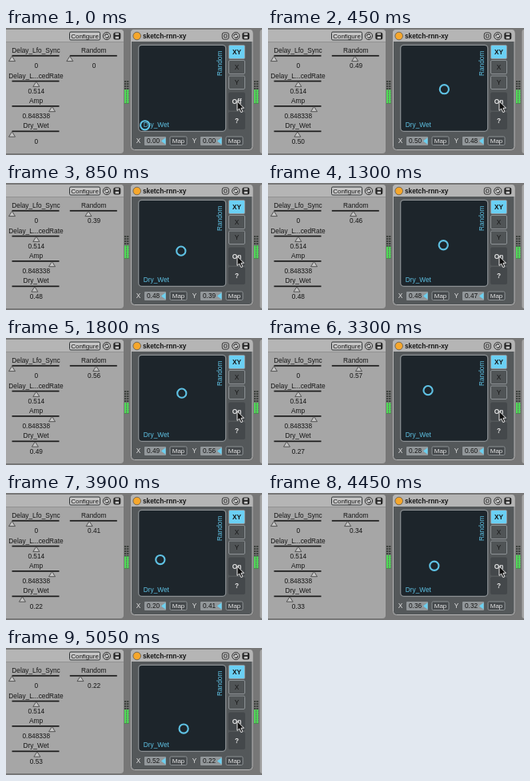
Recreate the animation shown at these times as an HTML page. Size 320 by 159 pixels, loop 5100 ms.

```html
<!DOCTYPE html>
<html lang="en">
<head>
<meta charset="utf-8">
<title>XY pad</title>
<style>
  html, body { margin: 0; width: 100%; height: 100%; overflow: hidden; background: #777; }
  svg { display: block; width: 100vw; height: 100vh; }
  text { font: 8.3px "Liberation Sans", Arial, sans-serif; fill: #161616; }
  .mid { text-anchor: middle; }
  .bold { font-weight: bold; }
  .blue { fill: #5fc2e4; }
  .small { font-size: 8px; }
  .pale { fill: #e2e2e2; }
</style>
</head>
<body>
<svg id="stage" viewBox="0 0 320 159" preserveAspectRatio="none"></svg>
<script>
const stage = document.getElementById('stage');
const LOOP = 5100, START = 300, LAG = 50;
const EDGE = '#8c9194', DARK = '#44484b';

function add(tag, attrs, content) {
  const el = document.createElementNS('http://www.w3.org/2000/svg', tag);
  for (const key in attrs) el.setAttribute(key, attrs[key]);
  if (content !== undefined) el.textContent = content;
  return stage.appendChild(el);
}
const rect = (x, y, width, height, fill, more) => add('rect', { x, y, width, height, fill, ...more });
const path = (d, fill, more) => add('path', { d, fill, ...more });
const circle = (cx, cy, r, fill, more) => add('circle', { cx, cy, r, fill, ...more });
const label = (x, y, content, cls = 'mid', more) => add('text', { x, y, class: cls, ...more }, content);

function button(x, y, w, h, fill, stroke, content, cls = 'mid') {
  rect(x + .5, y + .5, w - 1, h - 1, fill, { stroke, rx: 1.5 });
  return label(x + w / 2, y + h / 2 + 3, content, cls);
}

const iconDisc = x => circle(x, 10, 4.6, '#c9c9c9', { stroke: '#2c2c2c' });

function syncIcon(x) {
  iconDisc(x);
  path(`M${x - 2.4} 10.5A2.4 2.4 0 0 1 ${x + 1.8} 8.5M${x + 2.4} 9.5A2.4 2.4 0 0 1 ${x - 1.8} 11.5`,
    'none', { stroke: '#2c2c2c', 'stroke-width': 1.1 });
}

function saveIcon(x) {
  rect(x - 4.5, 5.5, 9, 9, '#262626', { rx: 2.5 });
  rect(x - 2.3, 6.5, 4.6, 2.2, '#c8c8c8');
  rect(x - 2.2, 10.7, 4.4, 2.6, '#c8c8c8');
}

function mapIcon(x) {
  rect(x - 4, 6, 8, 8, '#c9c9c9', { rx: 2, stroke: '#2c2c2c' });
  rect(x - 1.7, 8.3, 3.4, 3.4, 'none', { stroke: '#2c2c2c', 'stroke-width': .9 });
}

function slider(name, x, y, text, value) {
  label(x, y, name);
  rect(x - 30, y + 3.2, 59, 1.7, '#1c1c1c');
  const knob = path('M0 0L4 6.3H-4Z', '#c4c4c4', { stroke: '#4a4a4a', 'stroke-width': .9 });
  const readout = label(x + .3, y + 19.3, text);
  const set = (newText, v) => {
    readout.textContent = newText;
    knob.setAttribute('transform', `translate(${x - 30 + 59 * v} ${y + 4.6})`);
  };
  set(text, value);
  return set;
}

// Draws a stereo meter and returns its level setter
function meter(x) {
  const bars = [0, 3.1].map(dx => {
    for (let y = 66; y < 94; y += 3) rect(x + dx, y, 2.3, 2, '#3e423e');
    return rect(x + dx, 0, 2.3, 0, '#4fd957');
  });
  return top => bars.forEach(bar => {
    bar.setAttribute('y', top);
    bar.setAttribute('height', 94.5 - top);
  });
}

function numberBox(name, x) {
  label(x - 7.5, 144.3, name, 'mid pale');
  rect(x, 136, 27, 11, '#92979a', { rx: 1 });
  path(`M${x + 26.5} 137.2V145.8L${x + 21} 141.5Z`, '#6bd0f0');
  button(x + 31.5, 135.5, 22, 11.5, DARK, EDGE, 'Map', 'mid small pale');
  return label(x + 3, 144.3, '0.00', '');
}

// Left device
rect(-5, 2, 152, 155, '#a6a6a6', { rx: 4 });
path('M0 2H143Q147 2 147 6V17H0Z', '#b5b5b5');
rect(0, 17, 147, .8, '#8e8e8e');
button(79, 4.5, 39, 11, '#c6c6c6', '#303436', 'Configure', 'mid small');
syncIcon(126);
saveIcon(138.8);
slider('Delay_Lfo_Sync', 37.5, 30.7, '0', 0);
slider('Delay_L...cedRate', 37.5, 62.5, '0.514', .514);
slider('Amp', 37.5, 93.8, '0.848338', .848);
const setDryWet = slider('Dry_Wet', 37.5, 125.3, '0', 0);
const setRandom = slider('Random', 109.8, 30.7, '0', 0);
const meters = [meter(148)];

// Right device
rect(156.5, 2.5, 151.5, 150, '#54585a', { rx: 4, stroke: '#b5b5b5' });
path('M156 17V6Q156 2 160 2H304.5Q308.5 2 308.5 6V17Z', '#b5b5b5');
circle(163.7, 10, 4.8, '#f6a72c', { stroke: '#4d4d4d', 'stroke-width': .7 });
label(171, 13, 'sketch-rnn-xy', 'bold');
mapIcon(274.3);
syncIcon(287.3);
saveIcon(299.8);
rect(165.7, 21.3, 109, 108, '#1d252b', { rx: 4, stroke: EDGE, 'stroke-width': 1.2 });
label(171.8, 124, 'Dry_Wet', 'blue');
label(0, 0, 'Random', 'blue', { transform: 'translate(270 60) rotate(-90)' });
button(278, 21, 21, 18, '#6bd0f4', EDGE, 'XY', 'mid bold');
button(278, 40, 21, 18, '#505456', EDGE, 'X');
button(278, 59.5, 21, 17.5, '#505456', EDGE, 'Y');
const toggle = button(278, 80.5, 21, 23, DARK, DARK, 'Off', 'mid bold pale');
button(278, 105, 21, 22, DARK, DARK, '?', 'mid bold pale');
const boxX = numberBox('X', 173);
const boxY = numberBox('Y', 243);
const dot = circle(0, 0, 5.6, 'none', { stroke: '#5fc2e4', 'stroke-width': 2.1 });
rect(317.5, 2, 10, 155, '#a6a6a6', { rx: 3 });
meters.push(meter(310));
path('M289 91.7V103.4L291.7 101L293.8 105.6L295.9 104.7L293.9 100.2H297.5Z', '#111',
  { stroke: '#fff', 'stroke-width': .9 });

// Pen path: time (s), x, y, velocity x, velocity y
const keys = [
  [.3, .5, .5, 0, 0],
  [.85, .48, .39, 0, 0],
  [1.8, .49, .56, 0, 0],
  [2.45, .63, .19, .2, 0],
  [3.3, .28, .597, .3, .5],
  [3.9, .204, .407, -.3, 0],
  [5.1, .49, .22, -.6, 0]
];

function hermite(a, b, va, vb, span, u) {
  const u2 = u * u, u3 = u2 * u;
  return a * (2 * u3 - 3 * u2 + 1) + b * (3 * u2 - 2 * u3)
    + span * (va * (u3 - 2 * u2 + u) + vb * (u3 - u2));
}

function penAt(ms) {
  if (ms < START) return [0, 0];
  const s = ms / 1000;
  const i = Math.max(1, keys.findIndex(key => key[0] >= s));
  const a = keys[i - 1], b = keys[i];
  const span = b[0] - a[0], u = (s - a[0]) / span;
  return [1, 2].map(k => hermite(a[k], b[k], a[k + 2], b[k + 2], span, u));
}

const short = v => v ? v.toFixed(2) : '0';

function draw(ms) {
  const [x, y] = penAt(ms);
  const [wet, random] = penAt(ms - LAG);
  dot.setAttribute('cx', 173.7 + 94 * x);
  dot.setAttribute('cy', 121.8 - 94 * y);
  boxX.textContent = x.toFixed(2);
  boxY.textContent = y.toFixed(2);
  setDryWet(short(wet), wet);
  setRandom(short(random), random);
  toggle.textContent = ms < START ? 'Off' : 'On';
  const level = 79.5 - 2.5 * Math.cos(2 * Math.PI * ms / LOOP);
  meters.forEach(set => set(level));
}

const begin = performance.now();
function tick() {
  draw((performance.now() - begin) % LOOP);
  requestAnimationFrame(tick);
}
tick();
</script>
</body>
</html>
```
